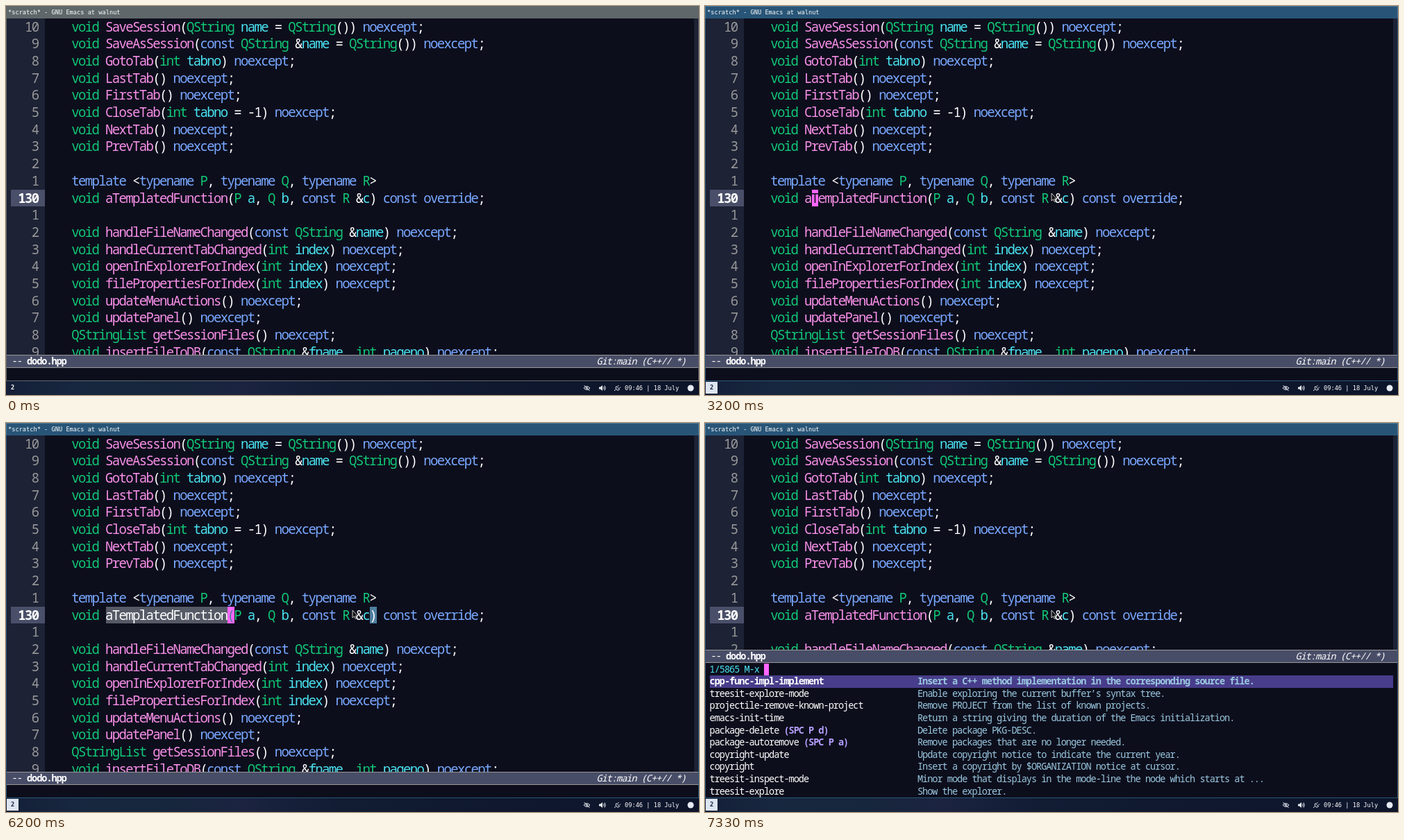
Animation, 998 px wide and 561 px high, one loop 8000 ms. Source, as an HTML page:

```html
<!DOCTYPE html>
<html lang="en">
<head>
<meta charset="utf-8">
<title>Editor session</title>
<style>
  html, body { margin: 0; width: 100%; height: 100%; overflow: hidden; background: #0d0e1c; }
  #stage {
    position: relative; width: 998px; height: 561px; overflow: hidden;
    background: #0d0e1c; color: #fff; white-space: pre;
    --frame: #5f676a; --edge: #5f676a;
  }
  #stage.focus { --frame: #285577; --edge: #4c7899; }
  #stage div, #stage svg { position: absolute; }
  .mono { font-family: "Noto Sans Mono", monospace; font-stretch: extra-condensed; font-variant-ligatures: none; }
  .big { font-size: 19px; line-height: 24.68px; }
  .small { font-size: 13.5px; line-height: 17.6px; }
  .ui { font: 8.67px/18px "DejaVu Sans Mono", monospace; }

  #title { left: 0; top: 0; width: 998px; height: 18px; box-sizing: border-box; background: var(--frame); border: 1px solid var(--edge); border-bottom-color: var(--frame); }
  #title span { position: absolute; left: 2px; top: -1px; }
  #border { left: 0; top: 18px; width: 998px; height: 523px; box-sizing: border-box; border: 1px solid var(--frame); border-top: 0; }

  #code { left: 1px; top: 18px; width: 996px; overflow: hidden; background: #0d0e1c; }
  #gutter { left: 0; top: 0; width: 55px; height: 100%; background: #1d2235; }
  #fringe { right: 0; top: 0; width: 6px; height: 100%; background: #1d2235; }
  #marks, #lines { left: 0; top: 0; }
  #current { left: 6px; width: 49px; height: 24.68px; background: #4a4f69; }
  .num { left: 0; width: 45.5px; text-align: right; color: #989898; }
  .num.on { color: #fff; font-weight: 700; }
  .box { height: 24.68px; }

  #mode { left: 1px; width: 996px; height: 19px; box-sizing: border-box; background: #484d67; border: 1px solid #979797; border-width: 1px 0; }
  #mode i { position: absolute; left: 850px; top: 0; }
  #mode span { position: absolute; left: 8px; top: 0; }
  #mini { left: 1px; top: 346px; width: 996px; height: 194px; overflow: hidden; background: #0d0e1c; }
  #pick { left: 6px; top: 18.1px; width: 984px; height: 17.6px; background: #483d8a; }
  #caret { left: 84px; top: 1px; width: 7px; height: 17px; background: #ff66ff; }
  .first { font-weight: 700; }

  .type { color: #11c777; }
  .key { color: #79a8ff; }
  .func { color: #f78fe7; }
  .var { color: #4ae2f0; }
  .doc { color: #9ac8e0; }
  .bind { color: #b6a0ff; font-weight: 700; }
  .region { color: #fff; }
  .under { color: #0d0e1c; }
  .under.paren { color: #4f7f9f; }

  #bar { left: 0; top: 541px; width: 998px; height: 20px;
    background: linear-gradient(90deg, #141f38, #17273f 100px, #16263c 230px, #1b2340 340px, #121c33 480px, #0f182e 700px, #0d152b); }
  #desk { left: 1px; top: 1px; width: 17px; height: 17px; text-align: center; font-weight: 700; line-height: 17px; }
  .focus #desk { background: #dde5f1; color: #18243f; }
  #clock { left: 891px; top: 1px; }
</style>
</head>
<body>
<div id="stage">
  <div id="title" class="ui"><span>*scratch* - GNU Emacs at walnut</span></div>
  <div id="border"></div>
  <div id="code" class="mono big">
    <div id="gutter"></div><div id="fringe"></div><div id="current"></div>
    <div id="marks"></div><div id="lines"></div>
  </div>
  <div id="mini" class="mono small"><div id="pick"></div><div id="caret"></div></div>
  <div id="mode" class="mono small"><span>-- <b>dodo.hpp</b></span><i>Git:main (C++// *)</i></div>
  <div id="bar" class="ui">
    <div id="desk">2</div>
    <svg style="left:0;top:0" width="998" height="20" fill="none" stroke="#e6eaf2">
      <path d="M832 10q4.500-5 9 0q-4.500 5-9 0M832.500 6l8 8"/>
      <circle cx="836.500" cy="10" r="1.300"/>
      <path d="M854 8.500h2l3-2.500v8l-3-2.500h-2z" fill="#e6eaf2" stroke="none"/>
      <path d="M860.500 8q1.500 2 0 4M862 6.500q2.500 3.500 0 7"/>
      <path d="M876 14l2.500-2.500M879 7.500l4.500 4.500q-2.500 2.500-4.500 0t0-4.500M880.500 8l2-2M883 10.500l2-2"/>
      <circle cx="986" cy="10" r="4.500" fill="#e6eaf2" stroke="none"/>
    </svg>
    <div id="clock">09:46 | 18 July</div>
  </div>
  <svg id="pointer" width="12" height="16" style="left:0;top:0">
    <path d="M1 1v11l2.600-2.200 1.700 3.700 1.700-.8-1.700-3.500h3.200z" fill="#111" stroke="#ddd" stroke-width=".9"/>
  </svg>
</div>
<script>
const LOOP = 8000, CELL = 9.75, SMALL_CELL = 7.13, ROW = 24.68, SMALL_ROW = 17.6;
const CODE_X = 94, ACTIVE = 10;

const code = `void SaveSession(QString name = QString()) noexcept;
void SaveAsSession(const QString &name = QString()) noexcept;
void GotoTab(int tabno) noexcept;
void LastTab() noexcept;
void FirstTab() noexcept;
void CloseTab(int tabno = -1) noexcept;
void NextTab() noexcept;
void PrevTab() noexcept;

template <typename P, typename Q, typename R>
void aTemplatedFunction(P a, Q b, const R &c) const override;

void handleFileNameChanged(const QString &name) noexcept;
void handleCurrentTabChanged(int index) noexcept;
void openInExplorerForIndex(int index) noexcept;
void filePropertiesForIndex(int index) noexcept;
void updateMenuActions() noexcept;
void updatePanel() noexcept;
QStringList getSessionFiles() noexcept;
void insertFileToDB(const QString &fname, int pageno) noexcept;`.split("\n");

// name | key binding | description
const commands = [
  "cpp-func-impl-implement||Insert a C++ method implementation in the corresponding source file.",
  "treesit-explore-mode||Enable exploring the current buffer’s syntax tree.",
  "projectile-remove-known-project||Remove PROJECT from the list of known projects.",
  "emacs-init-time||Return a string giving the duration of the Emacs initialization.",
  "package-delete|(SPC P d)|Delete package PKG-DESC.",
  "package-autoremove|(SPC P a)|Remove packages that are no longer needed.",
  "copyright-update||Update copyright notice to indicate the current year.",
  "copyright||Insert a copyright by $ORGANIZATION notice at cursor.",
  "treesit-inspect-mode||Minor mode that displays in the mode-line the node which starts at ...",
  "treesit-explore||Show the explorer."
];

// Columns refer to the active line.
const steps = [
  { at: 0 },
  { at: 600, focus: true, cursor: 6 },
  { at: 3730, focus: true, cursor: 5 },
  { at: 4200, focus: true, cursor: 6, from: 5 },
  { at: 4670, focus: true, cursor: 15, from: 5 },
  { at: 5130, focus: true, cursor: 23, from: 5, match: 44 },
  { at: 6730, focus: true, cursor: 15 },
  { at: 7070, focus: true, menu: true }
];

const $ = id => document.getElementById(id);

function add(parent, tag, cls, text, style) {
  const el = document.createElement(tag);
  el.className = cls || "";
  if (text) el.textContent = text;
  Object.assign(el.style, style);
  return parent.appendChild(el);
}

// Puts a monospaced font on the editor's character grid.
function setGrid(selector, cell) {
  for (const el of document.querySelectorAll(selector)) {
    const probe = add(el, "span", "", "0".repeat(50), { position: "absolute" });
    const gap = cell - probe.getBoundingClientRect().width / 50;
    probe.remove();
    el.style.letterSpacing = gap + "px";
    el.style.textIndent = gap / 2 + "px";
  }
}

function kind(word, next) {
  if (/^(void|int|QString|QStringList|[PQR])$/.test(word)) return "type";
  if (/^(const|noexcept|override|template|typename)$/.test(word)) return "key";
  if (/^[a-z]/i.test(word)) return next === "(" ? "func" : "var";
  return "";
}

function tokens(line) {
  return [...line.matchAll(/\w+|\W+/g)].map(m =>
    ({ text: m[0], col: m.index, cls: kind(m[0], line[m.index + m[0].length]) }));
}

const rowTop = i => i * ROW - 0.3 + "px";

const lineEls = code.map((line, i) => {
  const top = rowTop(i);
  const n = i === ACTIVE ? 130 : Math.abs(i - ACTIVE);
  add($("lines"), "div", i === ACTIVE ? "num on" : "num", String(n), { top });
  const el = add($("lines"), "div", "", "", { left: CODE_X + "px", top });
  tokens(line).forEach(t => add(el, "span", t.cls, t.text));
  return el;
});
$("current").style.top = rowTop(ACTIVE);

function miniText(col, row, text, cls) {
  add($("mini"), "div", cls, text, { left: 6 + col * SMALL_CELL + "px", top: 0.5 + row * SMALL_ROW + "px" });
}
miniText(0, 0, "1/5865 M-x", "var");
commands.forEach((entry, i) => {
  const [name, bind, doc] = entry.split("|");
  const bold = i ? "" : " first";
  miniText(0, i + 1, name, bold);
  if (bind) miniText(name.length + 1, i + 1, bind, "bind");
  miniText(42, i + 1, doc, "doc" + bold);
});

setGrid("#code", CELL);
setGrid("#mini, #mode", SMALL_CELL);

function mark(col, count, background) {
  add($("marks"), "div", "box", "", {
    left: CODE_X + col * CELL + "px", top: rowTop(ACTIVE),
    width: count * CELL + "px", background
  });
}

function charClass(s, col, cls) {
  if (col === s.cursor) return s.match ? "under paren" : "under";
  return s.from <= col && col < s.cursor ? "region" : cls;
}

function show(s) {
  $("stage").classList.toggle("focus", !!s.focus);
  const top = s.menu ? 327 : 503;
  $("code").style.height = top - 18 + "px";
  $("mode").style.top = top + "px";
  $("mini").style.display = s.menu ? "block" : "none";

  $("marks").replaceChildren();
  if (s.from !== undefined) mark(s.from, s.cursor - s.from, "#555a66");
  if (s.match) mark(s.match, 1, "#4f7f9f");
  if (s.cursor !== undefined) mark(s.cursor, 1, "#ff66ff");

  const line = lineEls[ACTIVE];
  line.replaceChildren();
  for (const t of tokens(code[ACTIVE]))
    [...t.text].forEach((ch, i) => add(line, "span", charClass(s, t.col + i, t.cls), ch));
}

function movePointer(t) {
  const p = Math.min(1, Math.max(0, (t - 600) / 270));
  const ease = 1 - (1 - p) ** 3;
  const x = 990 + (498 - 990) * ease, y = 300 + (269 - 300) * ease;
  $("pointer").style.visibility = t < 600 ? "hidden" : "visible";
  $("pointer").style.transform = `translate(${x}px, ${y}px)`;
}

const start = performance.now();
let shown;
function tick() {
  const t = (performance.now() - start) % LOOP;
  const step = steps.findLast(s => s.at <= t);
  if (step !== shown) show(shown = step);
  movePointer(t);
  requestAnimationFrame(tick);
}
tick();
</script>
</body>
</html>
```
